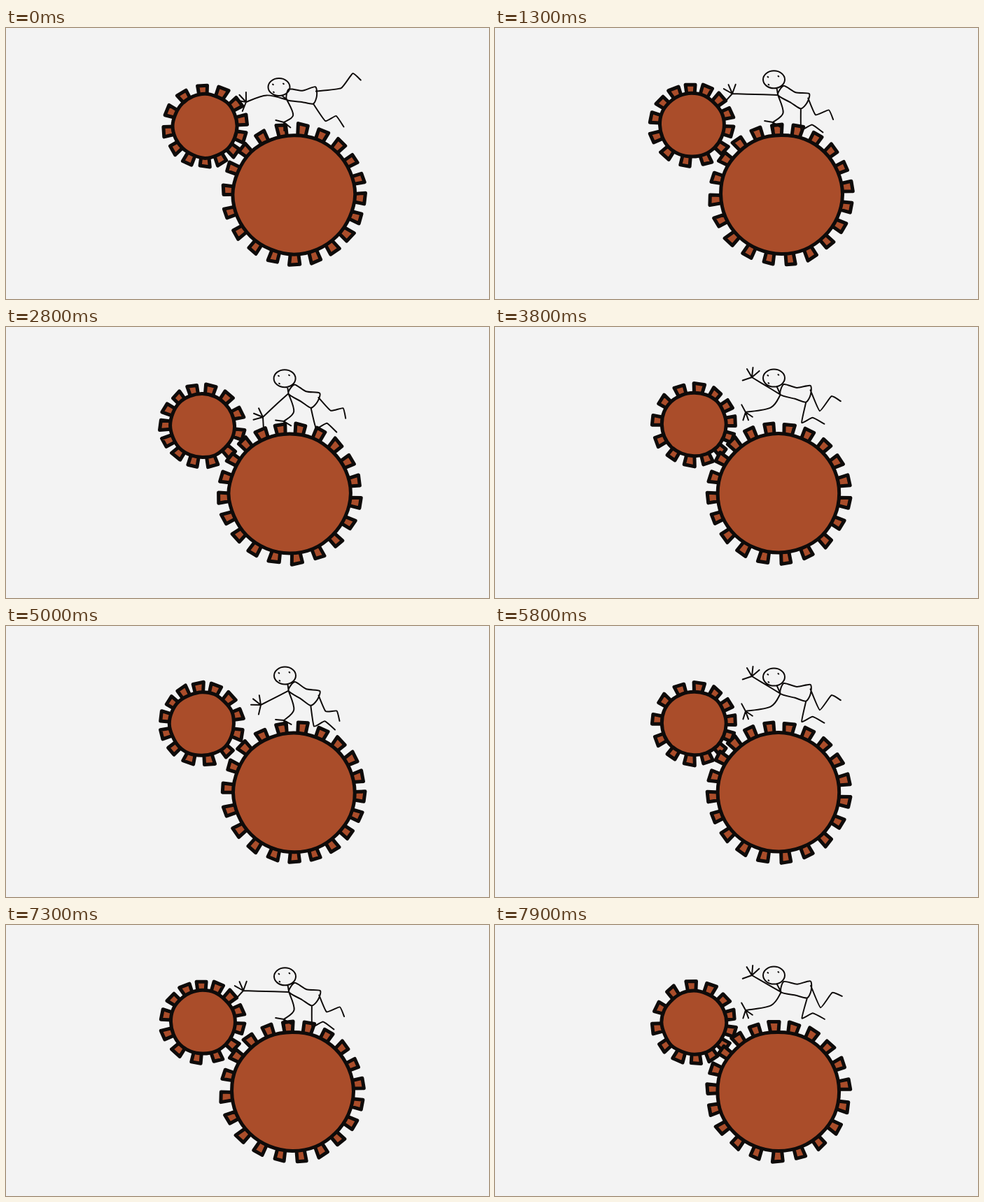
Write an HTML page that moves like this. It is 690x388 px and loops after 8 s.

```html
<!DOCTYPE html>
<html lang="en">
<head>
<meta charset="utf-8">
<title>Running on gears</title>
<style>
  html, body { margin: 0; width: 100%; height: 100%; overflow: hidden; background: #f3f3f3; }
  svg { display: block; width: 100vw; height: 100vh; }
  path { stroke: #0e0b0a; stroke-linejoin: round; stroke-linecap: round; }
  .gear { fill: #aa4d2a; stroke-width: 5; }
  .line { fill: none; stroke-width: 2; }
</style>
</head>
<body>
<svg viewBox="0 0 690 388">
  <path id="smallTeeth" class="gear"/><path id="smallDisc" class="gear"/>
  <path id="bigTeeth" class="gear"/><path id="bigDisc" class="gear"/>
  <path id="figure" class="line"/>
</svg>
<script>
const FRAME_MS = 100, CYCLE = 20, STRIDE = 10, LEAP = 16;
const { PI, sin, cos, atan2, hypot, min, max, floor } = Math;
const RAD = PI / 180;

// Where the free hand reaches: phase, x, y.
const REACH = [[0, 343, 106], [6, 355, 106], [8, 367, 129], [10, 364, 113], [13, 339, 94], [LEAP, 367, 72], [CYCLE, 367, 72]];
// Torso outline from the neck, before leaning.
const TORSO = [[0, 0], [19, 4], [38, 0], [39, 13], [33, 24], [17, 20], [-4, 15]];

const byId = id => document.getElementById(id);
const xy = ([x, y]) => x.toFixed(1) + ' ' + y.toFixed(1);
const add = ([x, y], [dx, dy]) => [x + dx, y + dy];
const polar = (angle, length) => [length * cos(angle * RAD), length * sin(angle * RAD)];
const rotate = ([x, y], angle) => add(polar(angle, x), polar(angle + 90, y));
const mix = (a, b, u) => a.map((v, i) => v + (b[i] - v) * u);
const stroke = (a, b) => `M${xy(a)}L${xy(b)}`;
const noise = n => { const s = sin(n * 12.9898) * 43758.5453; return (s - floor(s)) * 2 - 1; };
const ease = (from, to, t) => {
  const u = max(0, min(1, (t - from) / (to - from)));
  return u * u * (3 - 2 * u);
};

// Smooth curve through the points; bend 0 gives straight segments.
function curve(points, bend = 1 / 6, closed = false) {
  const n = points.length;
  const at = i => points[closed ? (i + n) % n : max(0, min(n - 1, i))];
  let d = 'M' + xy(at(0));
  for (let i = 0; i < (closed ? n : n - 1); i++) {
    const [p, a, b, q] = [at(i - 1), at(i), at(i + 1), at(i + 2)];
    const leave = [a[0] + (b[0] - p[0]) * bend, a[1] + (b[1] - p[1]) * bend];
    const arrive = [b[0] - (q[0] - a[0]) * bend, b[1] - (q[1] - a[1]) * bend];
    d += `C${xy(leave)} ${xy(arrive)} ${xy(b)}`;
  }
  return d;
}

function drawGear(name, { center, rx, ry, turn, crowd, count, height, seed }) {
  const reach = (rx + ry) / 2 + height / 2;
  let teeth = '';
  for (let k = 0; k < count; k++) {
    const [x, y] = add(crowd, polar(turn + k * 360 / count, reach));
    const a = atan2(y, x), n = seed + k * 3;
    const base = 1 / hypot(cos(a) / rx, sin(a) / ry);
    const point = (out, side) => xy(add(center, rotate([base + out, side], a / RAD)));
    const top = height + noise(n), half = 7.2 + noise(n + 1) * 0.7, tilt = noise(n + 2);
    teeth += `M${point(-1, -5.6)}L${point(top + tilt, -half)}L${point(top - tilt, half)}L${point(-1, 5.6)}Z`;
  }
  byId(name + 'Teeth').setAttribute('d', teeth);

  const rim = Array.from({ length: 16 }, (_, k) => {
    const a = k * PI / 8, w = noise(seed + 90 + k) * 0.7;
    return add(center, [(rx + w) * cos(a), (ry + w) * sin(a)]);
  });
  byId(name + 'Disc').setAttribute('d', curve(rim, 1 / 6, true) + 'Z');
}

function drawGears(phase, stride, bob) {
  drawGear('big', {
    center: [411.3 - 7.5 * stride, 238.3], rx: 86.8, ry: 85.3,
    turn: -104.5 + 7.2 * phase + 6.5 * bob,
    crowd: [6.5 - 11 * stride, -7 * stride],
    count: 20, height: 14.8, seed: phase * 173 + 11
  });
  const orbit = phase * 360 / CYCLE;
  drawGear('small', {
    center: [282.3 + 2.3 * cos(orbit * RAD), 140.3 + 1.7 * sin(orbit * RAD)], rx: 46, ry: 45.5,
    turn: -98.5 - 10.3 * phase,
    crowd: polar(orbit + 50, 7),
    count: 13, height: 13, seed: phase * 131 + 7
  });
}

function reachAt(phase) {
  const next = REACH.findIndex(key => key[0] > phase);
  const [from, to] = [REACH[next - 1], REACH[next]];
  return mix(from, to, (phase - from[0]) / (to[0] - from[0])).slice(1);
}

function leg(hip, ...bones) {
  const joints = [hip];
  for (const [angle, length] of bones) joints.push(add(joints.at(-1), polar(angle, length)));
  return curve(joints, 0.07);
}

function arm(shoulder, elbow, hand, spread, length) {
  const angle = atan2(hand[1] - elbow[1], hand[0] - elbow[0]) / RAD;
  return curve([shoulder, elbow, hand]) +
    spread.map(a => stroke(hand, add(hand, polar(angle + a, length)))).join('');
}

function drawFigure(phase, bob) {
  const rise = sin(PI / 2 * min(1, phase / STRIDE));
  const crouch = sin(PI * phase / CYCLE);
  const tuck = crouch ** 4;
  const head = [390 + 8.5 * rise, 84.5 - 13.5 * rise + 3.5 * bob];
  const neck = add(head, [14, 3 + 6 * rise]);
  const torso = TORSO.map(p => add(neck, rotate(p, -5 + 25 * crouch)));
  const [, , , rump, hip, , chest] = torso;

  const hand = reachAt(phase);
  const elbow = add(mix(chest, hand, 0.5), [0, -8 * (1 - rise)]);
  const support = mix([397, 135], [358, 122], ease(13, LEAP, phase));
  const supportElbow = add(mix(chest, support, 0.5), [11, 6]);
  const supportSpread = phase >= LEAP ? [-62, 72, -99, -135] : [52, -104, -54];

  const [x, y] = head;
  const dot = (dx, dy) => `M${xy([x + dx, y + dy])}l.8 .6`;
  byId('figure').setAttribute('d',
    `M${xy([x - 15.5, y])}a15.5 12.5 0 1 0 31 0a15.5 12.5 0 1 0 -31 0` +
    dot(-9, -4) + dot(6, -5) + dot(-8, 7) +
    curve(torso, 0.12, true) + stroke(add(head, [4, 12]), chest) +
    arm(chest, elbow, hand, [-50, 28, 65, 108], 14) +
    arm(chest, supportElbow, support, supportSpread, 12) +
    leg(mix(torso[2], rump, 0.5),
      [-7 + 73 * ease(4, STRIDE, phase), 36 - 11 * crouch],
      [-52 + 50 * tuck, 27 - 11 * tuck],
      [40 + 50 * crouch - 1.5 * phase, 15]) +
    leg(hip, [55 + 2.6 * phase, 30], [-25, 17], [55 - 1.5 * phase, 19]));
}

function draw(time) {
  const phase = floor(time / FRAME_MS) % CYCLE;
  const stride = phase % STRIDE / STRIDE;
  const bob = sin(PI * stride);
  drawGears(phase, stride, bob);
  drawFigure(phase, bob);
}

function tick(now) {
  draw(now);
  requestAnimationFrame(tick);
}
draw(0);
requestAnimationFrame(tick);
</script>
</body>
</html>
```
